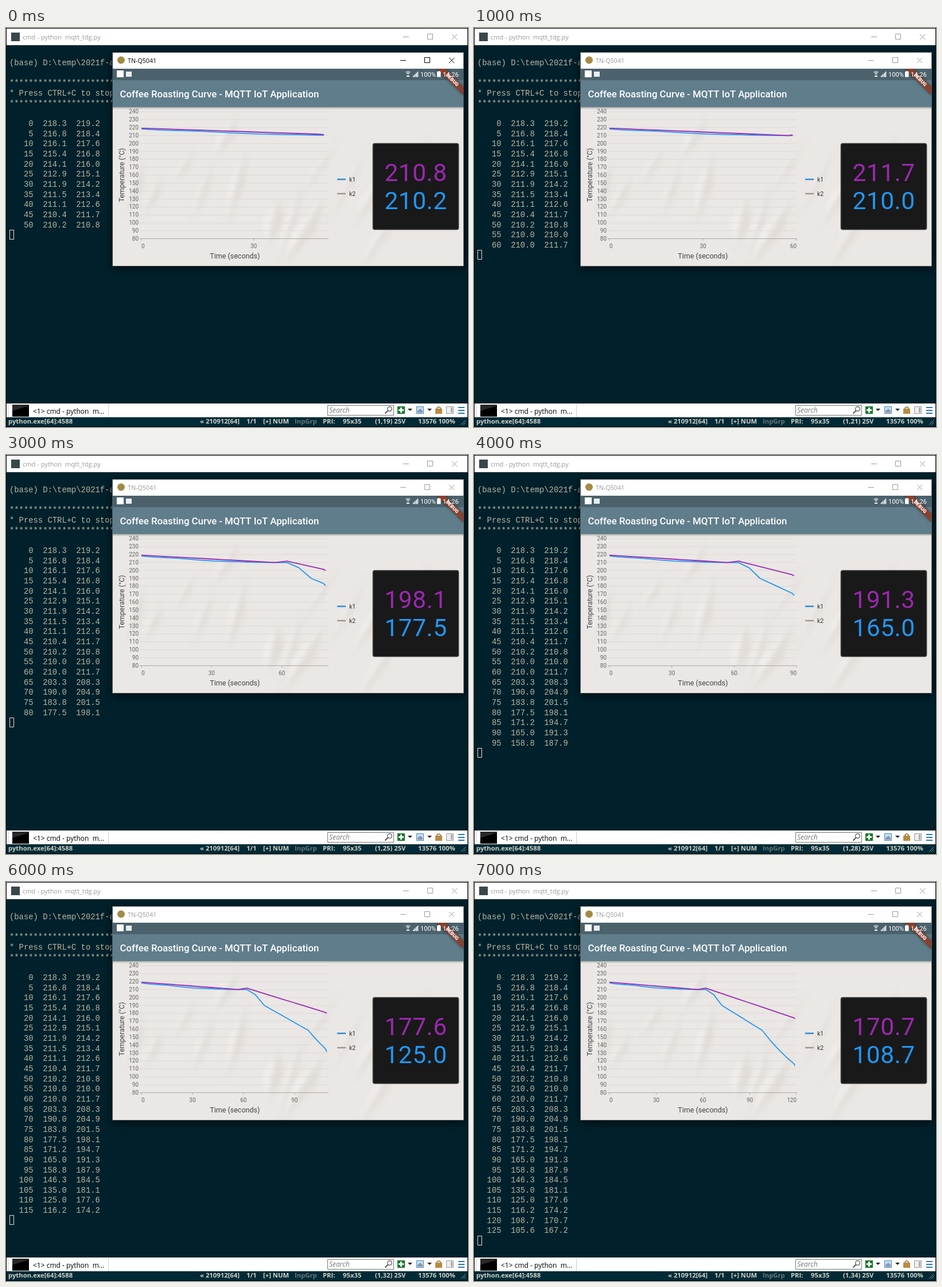
Write an HTML page with a canvas that moves like this. It is 805 by 696 pixels and loops after 8 s.

```html
<!DOCTYPE html>
<html lang="en">
<head>
<meta charset="utf-8">
<style>
  html, body { margin: 0; width: 100%; height: 100%; overflow: hidden; background: #000; }
  canvas { display: block; }
</style>
</head>
<body>
<canvas id="stage" width="805" height="696"></canvas>
<script>
const ctx = document.getElementById('stage').getContext('2d');
const SANS = '"Open Sans", sans-serif', ROBOTO = 'Roboto, sans-serif';
const MONO = '"Liberation Mono", monospace';
const BLUE = '#2196f3', PURPLE = '#9c27b0';

const mix = (a, b, t) => a + (b - a) * t;

// Temperature from key points [seconds, degrees, sag of the way there]
function curve(keys) {
  return t => {
    const i = Math.max(1, keys.findIndex(key => key[0] >= t));
    const [t0, v0] = keys[i - 1], [t1, v1, sag = 0] = keys[i];
    const p = (t - t0) / (t1 - t0);
    return mix(v0, v1, p) - sag * p * (1 - p);
  };
}

const k1 = curve([[0, 218.3], [5, 216.8], [15, 215.4], [25, 212.88], [30, 211.9], [40, 211.1], [45, 210.4],
  [55, 210], [60, 210], [65, 203.3], [70, 190], [80, 177.5], [90, 164.96], [95, 158.76], [120, 108.72, 15.6], [125, 105.6]]);
const k2 = curve([[0, 219.2], [20, 216], [30, 214.2], [40, 212.6], [50, 210.8], [55, 210], [60, 211.7],
  [105, 181.1], [125, 167.22]]);

function rect(x, y, w, h, fill) {
  ctx.fillStyle = fill;
  ctx.fillRect(x, y, w, h);
}

function frame(x, y, w, h, color) {
  ctx.strokeStyle = color;
  ctx.lineWidth = 1;
  ctx.strokeRect(x + .5, y + .5, w - 1, h - 1);
}

function line(points, color, width = 1) {
  ctx.beginPath();
  points.forEach(([x, y]) => ctx.lineTo(x, y));
  ctx.strokeStyle = color;
  ctx.lineWidth = width;
  ctx.stroke();
}

function arc(x, y, r, from, to, color, width) {
  ctx.beginPath();
  ctx.arc(x, y, r, from, to);
  ctx.strokeStyle = color;
  ctx.lineWidth = width;
  ctx.stroke();
}

function shape(points, fill) {
  ctx.beginPath();
  points.forEach(([x, y]) => ctx.lineTo(x, y));
  ctx.fillStyle = fill;
  ctx.fill();
}

function text(str, x, y, font, color, align = 'left') {
  ctx.font = font;
  ctx.fillStyle = color;
  ctx.textAlign = align;
  ctx.fillText(str, x, y);
}

function rotated(str, x, y, angle, font, color) {
  ctx.save();
  ctx.translate(x, y);
  ctx.rotate(angle);
  text(str, 0, 0, font, color, 'center');
  ctx.restore();
}

function windowButtons(x, y, color) {
  line([[x, y + .5], [x + 10, y + .5]], color);
  frame(x + 42, y - 5, 10, 10, color);
  line([[x + 85, y - 4], [x + 94, y + 5]], color);
  line([[x + 94, y - 4], [x + 85, y + 5]], color);
}

function terminal(rows) {
  rect(0, 0, 805, 696, '#000');
  rect(1, 1, 803, 29, '#fff');
  rect(9, 8, 15, 15, '#39474b');
  text('cmd - python  mqtt_tdg.py', 29, 20, `11.1px ${SANS}`, '#999');
  windowButtons(692, 15, '#999');
  rect(1, 30, 803, 625, '#00212b');

  const print = (str, row) => text(str, 6, 65 + row * 17.66, `13.85px ${MONO}`, '#b9b5a3');
  print('(base) D:\\temp\\2021f-a', 0);
  print('*'.repeat(23), 2);
  print('* Press CTRL+C to stop', 3);
  print('*'.repeat(23), 4);
  for (let i = 0; i < rows; i++) {
    const t = i * 5;
    print(`${String(t).padStart(5)}  ${k1(t).toFixed(1)}  ${k2(t).toFixed(1)}`, 6 + i);
  }
  frame(6, Math.round(157.5 + rows * 17.66), 8, 17, '#e0e0d8');
}

function taskBar(rows) {
  rect(1, 655, 803, 24, '#fff');
  rect(11, 657, 29, 21, '#000');
  shape([[11, 668], [40, 659], [40, 657], [11, 657]], '#292929');
  line([[178.5, 656], [178.5, 679]], '#ccc');
  line([[4.5, 656], [4.5, 679]], '#ddd');
  text('<1> cmd - python  m...', 47, 672.5, `12px ${SANS}`, '#000');

  frame(560, 658, 116, 18, '#777');
  text('Search', 563, 671, `italic 12px ${SANS}`, '#777');
  arc(668.5, 664.5, 3.8, 0, 7, '#555', 1.3);
  line([[665.5, 667.5], [660.5, 672.5]], '#555', 2);

  rect(682, 660, 13, 13, '#187a2c');
  rect(684, 665, 9, 3, '#fff');
  rect(687, 662, 3, 9, '#fff');
  for (const x of [704, 738]) shape([[x - 4, 664], [x + 4, 664], [x, 668]], '#222');
  rect(715, 660, 13, 13, '#c6e0f5');
  frame(715, 660, 13, 13, '#4b83b5');
  shape([[717, 671], [717, 668], [722, 664], [726, 668], [726, 671]], '#8797a8');
  arc(754, 664, 3, Math.PI, 0, '#987036', 1.7);
  rect(748, 664, 12, 9, '#b88b43');
  rect(767, 660, 13, 13, '#eee');
  frame(767, 660, 13, 13, '#999');
  rect(775, 662, 3, 9, '#aaa');
  for (let i = 0; i < 3; i++) rect(788, 661 + i * 5, 11, 2, '#2878b8');

  rect(1, 679, 803, 16, '#002b36');
  const status = (str, x, color = '#d0d0c8') => text(str, x, 690, `bold 11.3px ${SANS}`, color);
  status('python.exe[64]:4588', 4);
  status('« 210912[64]', 338);
  status('1/1', 419);
  status('[+] NUM', 448);
  status('InpGrp', 503, '#68777b');
  status('PRI:', 552);
  status('95x35', 587);
  status(`(1,${rows + 8}) 25V`, 643);
  status('13576 100%', 718);
  for (let i = 0; i < 3; i++) line([[801, 684 + i * 4], [793 + i * 4, 692]], '#8b9a9d');
}

function paper() {
  ctx.save();
  ctx.beginPath();
  ctx.rect(186, 138, 611, 277);
  ctx.clip();
  rect(186, 138, 611, 277, '#eae7e4');

  // Steep creases, each a lit fold beside a shaded one
  let seed = 11;
  const random = () => (seed = seed * 16807 % 2147483647) / 2147483647;
  ctx.filter = 'blur(4px)';
  for (let i = 0; i < 16; i++) {
    const x = 190 + i * 38 + random() * 30, y = 150 + random() * 150;
    const length = 60 + random() * 90, w = 8 + random() * 12;
    const endX = x - length * (.2 + random() * .5), endY = y + length;
    const midX = (x + endX) / 2, midY = (y + endY) / 2;
    shape([[x, y], [midX - w, midY], [endX, endY], [midX, midY]], '#f0eeec');
    shape([[x, y], [midX, midY], [endX, endY], [midX + w, midY]], '#e1dcd8');
  }
  ctx.filter = 'none';
  const shade = ctx.createLinearGradient(0, 138, 0, 142);
  shade.addColorStop(0, '#0004');
  shade.addColorStop(1, '#0000');
  rect(186, 138, 611, 4, shade);
  ctx.restore();
}

function phone(active) {
  ctx.save();
  ctx.shadowColor = '#000a';
  ctx.shadowBlur = 14;
  ctx.shadowOffsetY = 4;
  rect(185, 42, 613, 374, active ? '#30393c' : '#555c5f');
  ctx.restore();
  rect(186, 43, 611, 28, '#fff');
  const color = active ? '#000' : '#999';
  ctx.beginPath();
  ctx.arc(200.5, 56, 6.5, 0, 7);
  ctx.fillStyle = '#a38b45';
  ctx.fill();
  text('TN-Q5041', 212, 60.5, `10.7px ${SANS}`, color);
  windowButtons(687, 56, color);

  paper();
  rect(186, 71, 611, 20, '#4b626d');
  rect(186, 91, 611, 47, '#607d8b');
  text('Coffee Roasting Curve - MQTT IoT Application', 198.5, 121, `500 16.8px ${ROBOTO}`, '#fff');

  ctx.save();
  ctx.beginPath();
  ctx.rect(186, 71, 611, 344);
  ctx.clip();
  ctx.shadowColor = '#0008';
  ctx.shadowBlur = 5;
  shape([[750, 70], [764, 70], [798, 104], [798, 118]], '#89412f');
  ctx.restore();
  rotated('DEBUG', 775.6, 92.4, Math.PI / 4, `900 8.6px ${ROBOTO}`, '#fff');

  rect(193, 74, 12, 12, '#fff');
  rect(209, 76, 10, 9, '#e8eef0');
  for (const r of [2, 4.3, 6.6]) arc(700.5, 82.5, r, -2.2, -.94, '#fff', 1.2);
  rect(698, 83, 5, 2, '#fff');
  for (let i = 0; i < 4; i++) rect(709 + i * 2.5, 83 - i * 2.3, 1.7, 2.5 + i * 2.3, '#fff');
  text('100%', 722, 85, `11.2px ${ROBOTO}`, '#fff');
  rect(751, 76, 6.5, 9.5, '#fff');
  rect(753, 75, 2.5, 1, '#fff');
  text('14:26', 761, 85, `11.2px ${ROBOTO}`, '#fff');
}

function legend(name, y, color) {
  line([[577, y], [592, y]], color, 2.5);
  text(name, 598, y + 4, `10.5px ${ROBOTO}`, '#333');
}

function chart(span, progress) {
  const left = 236, width = 326, right = left + width;
  const py = v => 367.5 - (v - 80) * 1.384;
  for (let v = 80; v <= 240; v += 10) {
    line([[left - 3, py(v)], [right, py(v)]], v > 80 ? '#dcd9d7' : '#aaa7a5');
    text(v, 231, py(v) + 3.3, `10px ${ROBOTO}`, '#666', 'right');
  }
  for (let t = 0; t <= span; t += 30) {
    const x = left + width * t / span;
    line([[x, 367], [x, 371]], '#aaa7a5');
    text(t, x, 383.5, `10px ${ROBOTO}`, '#666', t === 0 ? 'left' : t === span ? 'right' : 'center');
  }
  text('Time (seconds)', 398.8, 402, `12.5px ${ROBOTO}`, '#444', 'center');
  rotated('Temperature (°C)', 206, 256.5, -Math.PI / 2, `12.4px ${ROBOTO}`, '#444');

  // Old points slide to the new scale while the newest grows out of its neighbour
  const before = span - 5;
  const px = t => left + width * mix(t / before, t / span, progress);
  ctx.lineJoin = 'round';
  for (const [temperature, color] of [[k1, BLUE], [k2, PURPLE]]) {
    const points = [];
    for (let t = 0; t <= before; t += 5) points.push([px(t), py(temperature(t))]);
    points.push([mix(px(before), right, progress), py(mix(temperature(before), temperature(span), progress))]);
    line(points, color, 1.8);
  }
  legend('k1', 264, '#2b8bd6');
  legend('k2', 289, '#a5968a');
}

function display(t) {
  ctx.beginPath();
  ctx.roundRect(639.5, 201.5, 149, 150, 3);
  ctx.fillStyle = '#191919';
  ctx.fill();
  ctx.strokeStyle = '#3c3c3c';
  ctx.lineWidth = 1.6;
  ctx.stroke();
  ctx.letterSpacing = '0.5px';
  text(k2(t).toFixed(1), 714, 266.5, `42.5px ${ROBOTO}`, PURPLE, 'center');
  text(k1(t).toFixed(1), 714, 315.5, `42.5px ${ROBOTO}`, BLUE, 'center');
  ctx.letterSpacing = '0px';
}

let shown = -1;
function tick() {
  const step = Math.floor(performance.now() / 1000) % 8;
  if (step !== shown) {
    shown = step;
    const charted = 50 + step * 10;
    const printed = charted + (step < 4 ? 0 : 5); // the terminal gets one reading ahead
    const rows = printed / 5 + 1;
    terminal(rows);
    taskBar(rows);
    phone(step === 0);
    chart(charted, .55 - step * .035);
    display(charted);
  }
  requestAnimationFrame(tick);
}
tick();
</script>
</body>
</html>
```
